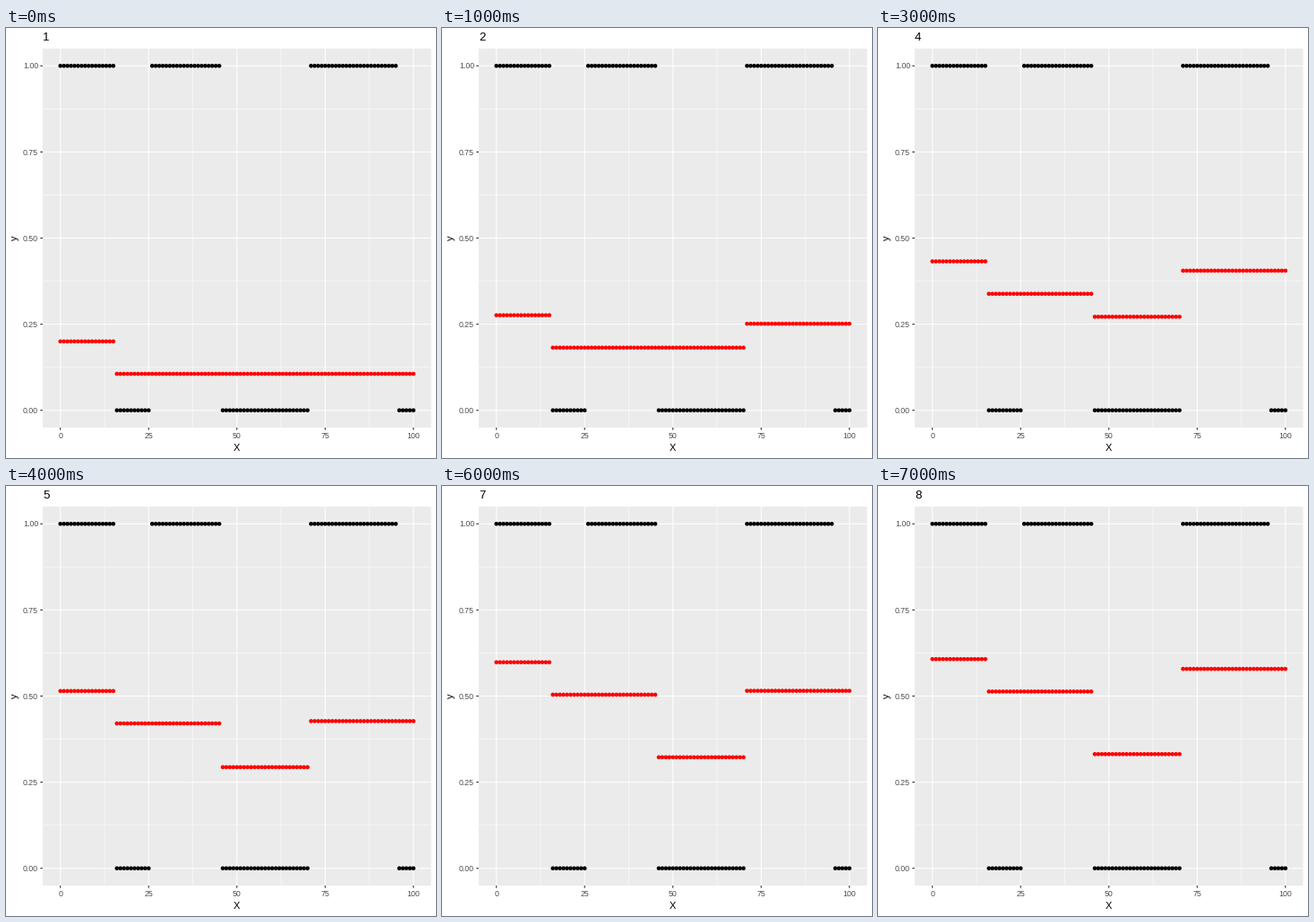
A matplotlib script that plays this animation: 480 px wide and 480 px high, repeating every 8 s.

```python
import matplotlib.pyplot as plt
import numpy as np
from matplotlib.animation import FuncAnimation
from matplotlib.patches import Rectangle

SIZE = 480
LEFT, RIGHT, TOP, BOTTOM = 41.0, 474.5, 23.0, 446.0
STEPS, RATE, MIN_LEAF = 8, 0.2, 7

plt.rcParams["font.family"] = "Liberation Sans"


def px(x):
    return LEFT + (RIGHT - LEFT) * (x + 5) / 110


def py(y):
    return BOTTOM - (BOTTOM - TOP) * (y + 0.05) / 1.1


def fit_stump(res):
    """Best single split of the residuals, as a step function."""
    n = len(res)
    splits = range(MIN_LEAF, n - MIN_LEAF + 1)
    gains = [k * (n - k) * (res[:k].mean() - res[k:].mean()) ** 2 for k in splits]
    k = splits[int(np.argmax(gains))]
    return np.where(np.arange(n) < k, res[:k].mean(), res[k:].mean())


def boost(y):
    fit, fits = np.zeros(len(y)), []
    for _ in range(STEPS):
        fit = fit + RATE * fit_stump(y - fit)
        fits.append(fit)
    return fits


xs = np.arange(101)
ys = (np.searchsorted([15, 25, 45, 70, 95], xs) % 2 == 0).astype(float)
fits = boost(ys)

fig = plt.figure(figsize=(SIZE / 72, SIZE / 72), dpi=72, facecolor="white")
ax = fig.add_axes([0, 0, 1, 1])
ax.set_xlim(0, SIZE)
ax.set_ylim(SIZE, 0)
ax.axis("off")


def line(x0, y0, x1, y1, color, width):
    ax.plot([x0, x1], [y0, y1], color=color, lw=width, snap=False,
            solid_capstyle="butt")


def dots(y, color):
    # One colour per dot keeps sub-pixel positions
    return ax.scatter(px(xs), py(y), s=4.6 ** 2, c=[color] * len(xs),
                      linewidths=0, zorder=3)


def label(x, y, text, size, color="black", **kw):
    return ax.text(x, y, text, fontsize=size, color=color, va="baseline", **kw)


ax.add_patch(Rectangle((LEFT, TOP), RIGHT - LEFT, BOTTOM - TOP,
                       fc="#EBEBEB", lw=0, snap=False))

for i in range(4):
    x, y = px(12.5 + 25 * i), py(0.125 + 0.25 * i)
    line(LEFT, y, RIGHT, y, "white", 0.53)
    line(x, TOP, x, BOTTOM, "white", 0.53)

for i in range(5):
    x, y = px(25 * i), py(0.25 * i)
    line(LEFT, y, RIGHT, y, "white", 1.07)
    line(x, TOP, x, BOTTOM, "white", 1.07)
    line(LEFT - 2.74, y, LEFT, y, "#333333", 1.07)
    line(x, BOTTOM, x, BOTTOM + 2.74, "#333333", 1.07)
    label(x, 458, str(25 * i), 8.8, "#4D4D4D", ha="center")
    label(36, y + 3.2, f"{0.25 * i:.2f}", 8.8, "#4D4D4D", ha="right")

label((LEFT + RIGHT) / 2, 472, "X", 11, ha="center")
label(13, (TOP + BOTTOM) / 2, "y", 11, ha="center", rotation=90,
      rotation_mode="anchor")
title = label(LEFT, 14, "1", 13.2, ha="left")

dots(ys, "black")
model = dots(fits[0], "red")


def update(step):
    title.set_text(str(step + 1))
    model.set_offsets(np.column_stack([px(xs), py(fits[step])]))
    return title, model


anim = FuncAnimation(fig, update, frames=STEPS, interval=1000, repeat=True,
                     repeat_delay=0)
plt.show()
```
